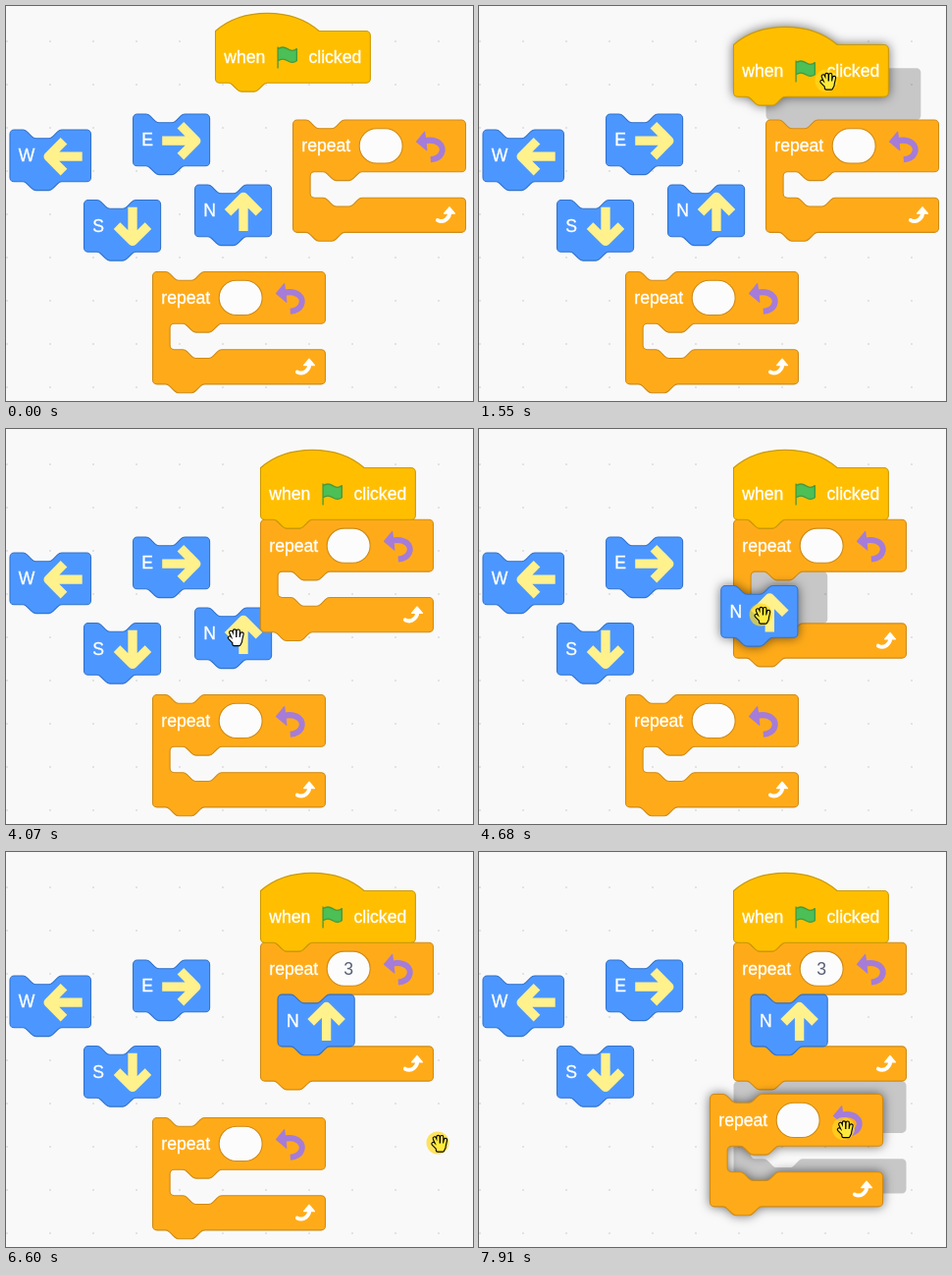
Animation, 476 px wide and 402 px high, one loop 7990 ms. Source, as an HTML page:

```html
<!DOCTYPE html>
<html lang="en">
<head>
<meta charset="utf-8">
<title>Block script</title>
<style>
html, body { margin: 0; width: 100%; height: 100%; overflow: hidden; background: #f9f9f9; }
svg { display: block; }
text { font: 16px "Liberation Sans", Arial, sans-serif; fill: #fff; stroke: #fff; stroke-width: .3; }
.motion { fill: #4c97ff; stroke: #3373cc; }
.control { fill: #ffab19; stroke: #cf8b17; }
.event { fill: #ffbf00; stroke: #cc9900; }
.flag { fill: #4cbf56; stroke: #45993d; stroke-width: 1.2; stroke-linejoin: round; }
.drag { filter: drop-shadow(0 0 5px rgba(0, 0, 0, .55)); }
.arrow { fill: none; stroke: #fff18c; stroke-width: 8.5; stroke-linejoin: round; }
.turn { fill: none; stroke: #a57cd8; stroke-width: 5.5; }
.turn-head { fill: #a57cd8; stroke: #a57cd8; stroke-linejoin: round; }
.cycle { fill: none; stroke: #fff; stroke-width: 3.6; stroke-linecap: round; }
.cycle-head { fill: #fff; stroke: #fff; stroke-linejoin: round; }
.slot { fill: #fcfcfc; stroke: #cf8b17; }
.ring { fill: none; stroke: #fff; stroke-width: 5; opacity: .35; }
.digit { fill: #575e75; stroke: none; text-anchor: middle; }
.ghost { fill: #000; opacity: .2; }
.press { fill: #ffd820; opacity: .7; }
.pointer { fill: #fff; stroke: #000; stroke-linejoin: round; }
.rim, .skin { stroke-linecap: round; stroke-linejoin: round; }
.rim { stroke: #000; stroke-width: 4.4; }
.skin { fill: #fff; stroke: #fff; stroke-width: 2.2; }
.down .skin { fill: #ffea3c; stroke: #ffea3c; }
</style>
</head>
<body>
<svg id="stage" width="476" height="402" viewBox="0 0 476 402">
  <defs>
    <pattern id="dots" x="44" y="35" width="44" height="44" patternUnits="userSpaceOnUse">
      <path d="M0 1h2" stroke="#ddd" stroke-width="1.5"/>
    </pattern>
  </defs>
  <rect width="476" height="402" fill="url(#dots)"/>
</svg>
<script>
const LOOP = 7990, TICK = 77, SCALE = 1.1;
const stage = document.getElementById('stage');

// Block outlines, in unscaled block units
const NOTCH = 'c2 0 3 1 4 2l4 4c1 1 2 2 4 2h12c2 0 3-1 4-2l4-4c1-1 2-2 4-2';
const TAB = 'c-2 0-3 1-4 2l-4 4c-1 1-2 2-4 2h-12c-2 0-3-1-4-2l-4-4c-1-1-2-2-4-2';
const HEAD = `M0 4a4 4 0 0 1 4-4h8${NOTCH}`;
const FOOT = `H48${TAB}H4a4 4 0 0 1-4-4z`;
const edge = (w, h) => `H${w - 4}a4 4 0 0 1 4 4v${h - 8}a4 4 0 0 1-4 4`;
const stackPath = w => HEAD + edge(w, 48) + FOOT;
const loopPath = mouth => HEAD + edge(160, 48) +
  `H64${TAB}H20a4 4 0 0 0-4 4v${mouth - 8}a4 4 0 0 0 4 4h8${NOTCH}` + edge(160, 32) + FOOT;
const HAT = 'M0 0c25-22 71-22 96 0' + edge(143.5, 48) + FOOT;
const STEP = stackPath(71);

function group(html) {
  const g = document.createElementNS('http://www.w3.org/2000/svg', 'g');
  g.innerHTML = html;
  stage.append(g);
  return g;
}
const place = (g, [x, y], s = SCALE) => g.setAttribute('transform', `translate(${x} ${y}) scale(${s})`);
const show = (g, on) => g.setAttribute('visibility', on ? 'visible' : 'hidden');
const shift = ([x, y], dx, dy) => [x + dx * SCALE, y + dy * SCALE];
const ghost = d => group(`<path class="ghost" d="${d}"/>`);

function arrowBlock(letter, pos, angle, extra = 0) {
  const g = group(`<path class="motion" d="${stackPath(71 + extra)}"/><text x="8" y="29.5">${letter}</text>
    <path class="arrow" transform="translate(${45 + extra} 24.7) rotate(${angle})" d="M-18 0H13M-1-14.5L13.4 0L-1 14.5"/>`);
  place(g, pos);
  return g;
}
const loopBlock = () => group(`<path class="control body" d="${loopPath(24)}"/>
  <text x="8" y="29.5">repeat</text>
  <rect class="ring" x="59" y="5.5" width="45" height="37" rx="18.5" visibility="hidden"/>
  <rect class="slot" x="61.5" y="8" width="40" height="32" rx="16"/>
  <text class="digit" x="81.5" y="29.7"></text>
  <path class="turn" d="M121 19.5C134 16.5 141 24 137.5 31Q135 36 127.5 36.5"/>
  <path class="turn-head" d="M114.5 20L122 11L124 28z"/>
  <g class="icon" transform="translate(128 76)">
    <path class="cycle" d="M6 16.7Q10.5 19 14 16T17 10"/><path class="cycle-head" d="M17 4.5L12 10.5H22z"/>
  </g>`);

const HOME = { hat: [213.5, 25.5], north: [192.5, 182], loopA: [292.5, 116], loopB: [149.5, 270.5] };

arrowBlock('W', [4, 126], 180, 4);
arrowBlock('E', [129.5, 110], 0);
arrowBlock('S', [79.5, 197.5], 90);
const north = arrowBlock('N', HOME.north, -90);
const hatGhost = ghost(HAT), northGhost = ghost(STEP), loopGhost = ghost(loopPath(24));
const loopA = loopBlock();
const hat = group(`<path class="event" d="${HAT}"/><text x="8" y="29.5">when</text>
  <path class="flag" transform="translate(54.3 12)" d="M3.5 2.5V22V15.5q4.5-3 9 0t8.500 0V4.500q-4 3-8.500 0t-9 0"/>
  <text x="86.3" y="29.5">clicked</text>`);
const loopB = loopBlock();

// The hand is drawn twice: a thick dark rim, then a thinner light fill
const HAND = 'M-6.5 .5L-2 5M-5.2-5L-2.5 1M-1.5-6.5V1M2.2-6.3L2 1M6-3.5L4.5 3M-2.500 1H4.500V4L3 7H-2z';
const cursor = group(`<circle class="press" r="11.5"/>
  <g transform="translate(2 .5)"><path class="rim" d="${HAND}"/><path class="skin" d="${HAND}"/></g>
  <path class="pointer" transform="translate(1 2)" d="M0 0v15l3.5-3.3 2.4 5.6 2.6-1.1-2.4-5.5h4.8z"/>`);
const [press, hand, pointer] = cursor.children;
const part = name => loopA.querySelector(name);

// Each drag: first and last step, then the drop
const dragHat = { from: 1240, to: 1550, drop: 1850 };
const dragNorth = { from: 4300, to: 4760, drop: 5140 };
const dragLoop = { from: 7510, to: 7910, drop: LOOP };

// Progress advances once per tick; the first step shows at once
function progress(t, from, to) {
  if (t < from) return 0;
  const last = Math.round((to - from) / TICK);
  const step = Math.floor((t - from) / (to - from) * last + 1e-6);
  return Math.min(1, (step + 1) / (last + 1));
}
const mix = (a, b, p) => a.map((v, i) => v + (b[i] - v) * p);
const bend = (a, c, b, p) => mix(mix(a, c, p), mix(c, b, p), p);
const carry = (t, { from, to }, home, end, power = 1) => mix(home, end, progress(t, from, to) ** power);

const trip = (from, to, end, via) => ({ from, to, end, via });
const START = [325, 320];
const TRIPS = [
  trip(380, 1160, [306, 62], [395, 190]),
  { ...trip(dragHat.from, dragHat.to, [354, 76]), power: .52 },
  trip(2720, 2870, [352, 106]),
  trip(3040, 3810, [236, 194]),
  trip(3900, 4070, [232.5, 211.5]),
  trip(dragNorth.from, dragNorth.to, [309, 180]),
  trip(dragNorth.drop, 5680, [360, 114], [325, 121]),
  trip(5820, 6600, [440, 296]),
  trip(6680, 7440, [286, 305], [360, 395]),
  trip(dragLoop.from, dragLoop.to, [371.5, 281.5], [326, 305])
];
function cursorAt(t) {
  return TRIPS.filter(m => t >= m.from).reduce((pos, { from, to, end, via, power = 1 }) =>
    bend(pos, via || mix(pos, end, .5), end, progress(t, from, to) ** power), START);
}

function draw(t) {
  const within = (a, b) => t >= a && t < b;
  const held = d => within(d.from, d.drop);
  const lift = (g, d) => g.setAttribute('class', held(d) ? 'drag' : '');

  const hatPos = carry(t, dragHat, HOME.hat, [259.5, 39.5], .52);
  const loopPos = t < dragHat.drop ? HOME.loopA : shift(hatPos, 0, 48);
  const mouthPos = shift(loopPos, 16, 48);
  const northPos = t < dragNorth.drop ? carry(t, dragNorth, HOME.north, [268.5, 150.5]) : mouthPos;
  place(hat, hatPos);
  place(loopA, loopPos);
  place(north, northPos);
  place(loopB, carry(t, dragLoop, HOME.loopB, [235.5, 246.5], 1.7));
  lift(hat, dragHat);
  lift(north, dragNorth);
  lift(loopB, dragLoop);
  stage.insertBefore(north, t < dragNorth.from ? hatGhost : hat);

  // Grey previews of where a dragged block would land
  const open = t >= dragNorth.from + 3 * TICK;
  place(hatGhost, shift(loopPos, 0, -48));
  place(northGhost, open ? mouthPos : shift(loopPos, 0, 104));
  place(loopGhost, shift(loopPos, 0, 128));
  show(hatGhost, within(dragHat.from + 3 * TICK - 1, dragHat.drop));
  show(northGhost, within(dragNorth.from + 2 * TICK - 24, dragNorth.drop));
  show(loopGhost, within(dragLoop.from + 3 * TICK, dragLoop.drop));

  const mouth = open ? 48 : 24;
  part('.body').setAttribute('d', loopPath(mouth));
  place(part('.icon'), [128, 52 + mouth], 1);
  show(part('.ring'), within(5820, 6600));
  part('.digit').textContent = t < 6130 ? '' : '3';

  const point = [dragHat, dragNorth, dragLoop].some(d => within(d.from, d.from + TICK));
  const down = within(1160, 2250) || held(dragNorth) || within(5680, 5820) || within(6600, 6680) || t >= 7440;
  place(cursor, cursorAt(t), 1);
  cursor.setAttribute('class', down ? 'down' : '');
  show(press, down);
  show(hand, t >= TRIPS[0].from && !point);
  show(pointer, point);
}

const start = performance.now();
function tick() {
  draw((performance.now() - start) % LOOP);
  requestAnimationFrame(tick);
}
draw(0);
requestAnimationFrame(tick);
</script>
</body>
</html>
```
